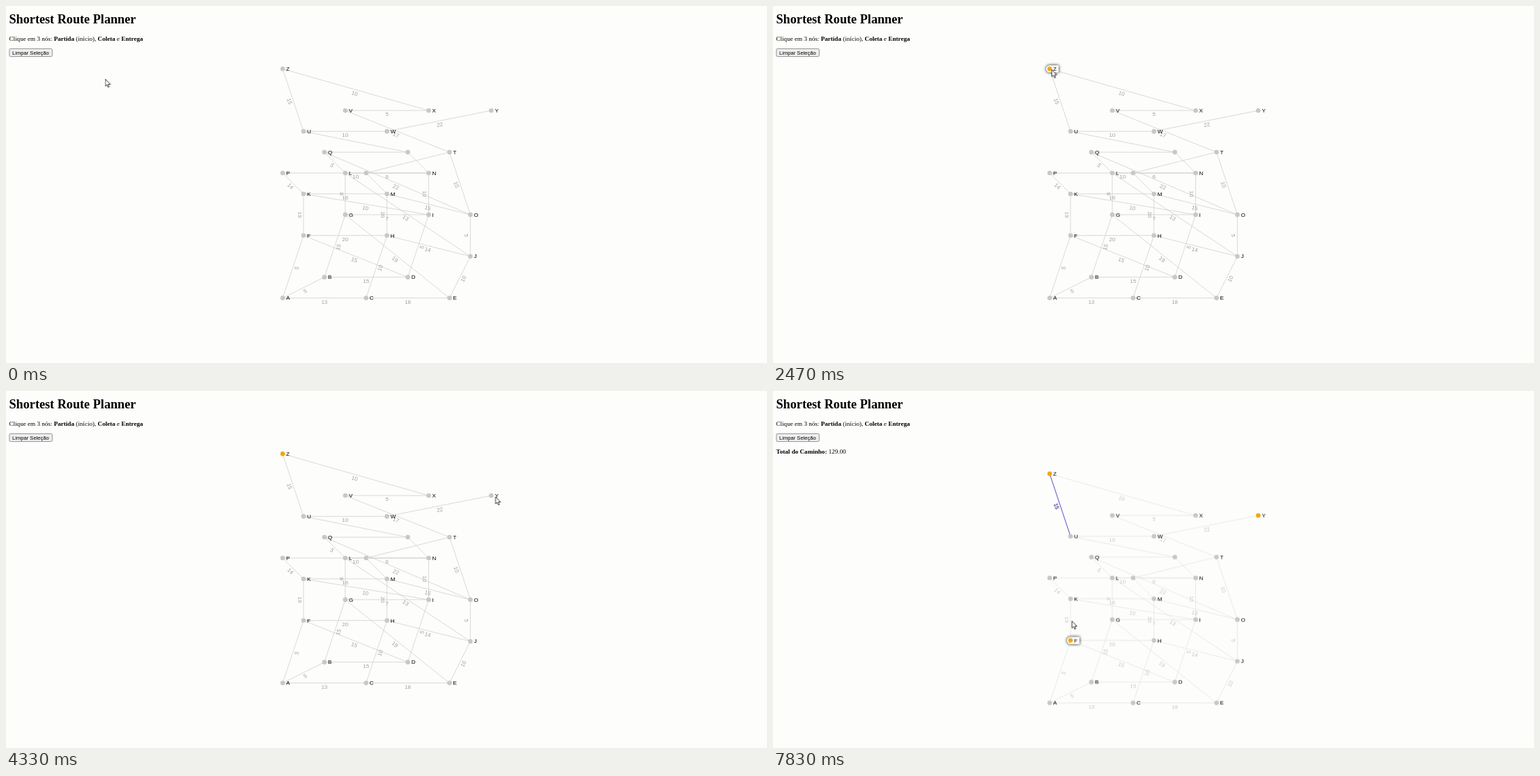
These frames come from a looping animation (1092 by 513 pixels, 8000 ms). An HTML page:

```html
<!DOCTYPE html>
<html lang="pt">
<head>
<meta charset="utf-8">
<title>Shortest Route Planner</title>
<style>
  html, body { margin: 0; width: 100%; height: 100%; overflow: hidden; background: #fdfefc; }
  svg { display: block; width: 1092px; height: 513px; }
  .page { font: 9.1px "Liberation Serif", serif; }
  .bold { font-weight: bold; }
  .title { font-size: 18.2px; font-weight: bold; }
  .ui, #graph { font-family: "Liberation Sans", sans-serif; }
  .ui { font-size: 7.6px; }
  #graph { font-size: 8px; }
  #links { stroke: #c9c9c9; stroke-width: .7; }
  #weights { fill: #a0a0a0; }
  #dots { fill: #c8c8c8; }
  .weight { text-anchor: middle; }
  .halo { fill: #fff; filter: drop-shadow(0 0 2.2px #000); }
</style>
</head>
<body>
<svg viewBox="0 0 1092 513">
  <g class="page">
    <text class="title" x="4.5" y="24.6">Shortest Route Planner</text>
    <text x="4.5" y="50">Clique em 3 nós: <tspan class="bold">Partida</tspan> (início), <tspan class="bold">Coleta</tspan> e <tspan class="bold">Entrega</tspan></text>
    <text id="total" x="4.5" y="90.2"><tspan class="bold">Total do Caminho:</tspan> 129.00</text>
  </g>
  <g class="ui">
    <rect id="button" x="4.9" y="61.4" width="61.4" height="11.2" rx="1.6" fill="#efefef" stroke="#7a7a7a" stroke-width=".8"/>
    <text x="9" y="69.6">Limpar Seleção</text>
  </g>
  <g id="graph">
    <g id="links"></g>
    <g id="weights"></g>
    <g id="route"></g>
    <g id="dots"></g>
    <g id="names"></g>
    <g id="hovers"></g>
  </g>
  <path id="cursor" d="M0 0V10.2L2.4 8.1L4 11.8L5.6 11.1L4.1 7.5H7.2Z" fill="#fff" stroke="#222" stroke-width=".9" stroke-linejoin="round"/>
</svg>
<script>
const LOOP = 8000, UNIT = 29.93, RADIUS = 3.3, ORANGE = '#f0a80c';
const $ = id => document.getElementById(id);

// Grid cell of each node: columns to the right, rows upwards.
const cells = {
  A: [0, 0], B: [2, 1], C: [4, 0], D: [6, 1], E: [8, 0], F: [1, 3], G: [3, 4],
  H: [5, 3], I: [7, 4], J: [9, 2], K: [1, 5], L: [3, 6], M: [5, 5], N: [7, 6],
  O: [9, 4], P: [0, 6], Q: [2, 7], R: [4, 6], S: [6, 7], T: [8, 7], U: [1, 8],
  V: [3, 9], W: [5, 8], X: [7, 9], Y: [10, 9], Z: [0, 11]
};
// Pairs without a number carry no visible weight.
const edges = `AB5 AF5 AC13 CE18 CH10 BD15 BG15 FD15 DI5 GE19 EJ10 FH20 KF19 GI7 LG8
  KM16 MH20 HJ14 OJ5 LJ13 KI10 NI10 MO15 QO22 RM QL5 PK14 PN10 LN6 QS SN US RT
  TO10 VT17 UW10 ZU15 VX5 WY22 ZX10`.split(/\s+/);
const unlabelled = 'RS';

function add(parent, tag, attrs, text) {
  const el = document.createElementNS('http://www.w3.org/2000/svg', tag);
  for (const key in attrs) el.setAttribute(key, attrs[key]);
  if (text) el.textContent = text;
  return parent.appendChild(el);
}

const place = name => [397 + UNIT * cells[name][0], 419.6 - UNIT * cells[name][1]];

function drawEdge(edge, lines, labels) {
  const ends = [place(edge[0]), place(edge[1])];
  const [[x1, y1], [x2, y2]] = ends.sort((a, b) => a[0] - b[0] || a[1] - b[1]);
  add(lines, 'line', { x1, y1, x2, y2 });
  const angle = Math.atan2(y2 - y1, x2 - x1) * 180 / Math.PI;
  add(labels, 'text', {
    class: 'weight', y: 8.2,
    transform: `translate(${(x1 + x2) / 2} ${(y1 + y2) / 2}) rotate(${angle})`
  }, edge.slice(2));
}

function drawDot(parent, name) {
  const [cx, cy] = place(name);
  return add(parent, 'circle', { cx, cy, r: RADIUS });
}

function drawName(parent, name) {
  const [x, y] = place(name);
  return add(parent, 'text', { x: x + 5.1, y: y + 2.7 }, name);
}

edges.forEach(edge => drawEdge(edge, $('links'), $('weights')));
const dots = {};
for (const name in cells) {
  dots[name] = drawDot($('dots'), name);
  if (!unlabelled.includes(name)) drawName($('names'), name);
}

const route = add($('route'), 'g', {});
drawEdge('ZU15', add(route, 'g', { stroke: '#4a3fc8', 'stroke-width': .9 }),
  add(route, 'g', { fill: '#24149c' }));

// Runs one property through [time, value] pairs, with hard changes.
function switchAt(el, prop, steps) {
  const frames = steps.map(([time, value]) =>
    ({ offset: time / LOOP, [prop]: value, easing: 'step-end' }));
  frames.push({ offset: 1, [prop]: steps[steps.length - 1][1] });
  el.animate(frames, { duration: LOOP, iterations: Infinity });
}

const showFrom = (el, from, to = LOOP) => switchAt(el, 'opacity',
  to < LOOP ? [[0, 0], [from, 1], [to, 0]] : [[0, 0], [from, 1]]);

function hover(name, from, to) {
  const group = add($('hovers'), 'g', {});
  const [x, y] = place(name), r = 5.15;
  const halo = add(group, 'path', { class: 'halo' });
  const dot = drawDot(group, name);
  const width = drawName(group, name).getComputedTextLength();
  halo.setAttribute('d', `M${x} ${y - r}H${x + r + width + 2.8}V${y + r}H${x}A${r} ${r} 0 0 1 ${x} ${y - r}Z`);
  showFrom(group, from, to);
  return dot;
}

function pick(name, time, from, to) {
  for (const dot of [dots[name], hover(name, from, to)])
    switchAt(dot, 'fill', [[0, '#c8c8c8'], [time, ORANGE]]);
}

const RESULT = 7730;
pick('Z', 2400, 1900, 2700);
pick('Y', 5000, 4400, 5100);
pick('F', RESULT, RESULT);
hover('A', 5800, 7470).setAttribute('fill', '#c8c8c8');

switchAt($('button'), 'fill', [[0, '#efefef'], [770, '#e4e4e4'], [900, '#efefef']]);
showFrom($('total'), RESULT);
showFrom(route, RESULT + 70);
switchAt($('graph'), 'transform', [[0, 'translateY(0px)'], [RESULT, 'translateY(28.6px)']]);
switchAt($('links'), 'stroke', [[0, '#c9c9c9'], [RESULT, '#e0e0e0']]);
switchAt($('weights'), 'fill', [[0, '#a0a0a0'], [RESULT, '#c6c6c6']]);

// Pointer path: time, x, y.
const pointer = [
  [0, 142.5, 105], [30, 142.5, 105], [830, 42.5, 71.5], [860, 42.5, 71.5],
  [1200, 524, 159], [1465, 524, 159], [1630, 400, 91.5], [2630, 400, 91.5],
  [3130, 481.5, 159], [3430, 560, 169], [4270, 709, 157], [4330, 702.5, 152],
  [4530, 699, 151], [5030, 699, 151], [5270, 590, 262], [5570, 590, 262],
  [5600, 434.5, 407.5], [6030, 399, 418], [7470, 399, 418], [7500, 430, 333],
  [7730, 430, 333], [7830, 429, 330.5], [LOOP, 429, 330.5]
];
$('cursor').animate(
  pointer.map(([time, x, y]) => ({ offset: time / LOOP, transform: `translate(${x}px, ${y}px)` })),
  { duration: LOOP, iterations: Infinity });
</script>
</body>
</html>
```
